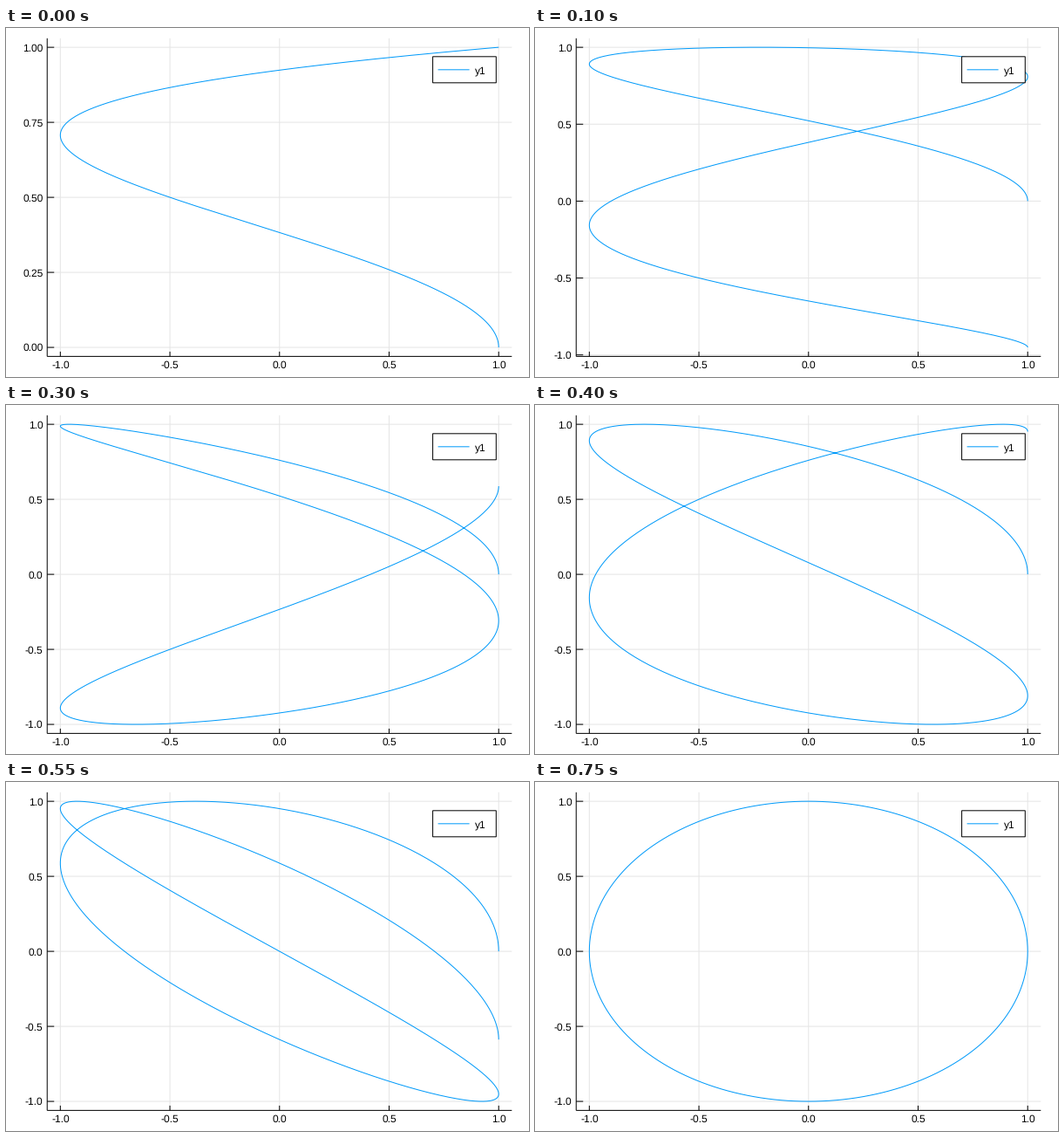
Recreate the animation shown at these times as a matplotlib script. Size 600 px wide and 400 px high, loop 800 ms.

```python
import numpy as np
import matplotlib.pyplot as plt
from matplotlib.animation import FuncAnimation
from matplotlib.patches import Rectangle

W, H, DPI = 600, 400, 100
FRAMES, INTERVAL = 16, 50
PX = 72 / DPI  # one pixel in points

LEFT, RIGHT, TOP, BOTTOM = 47.24, 580.31, 11.81, 376.38
TICK = 0.015  # tick length as a share of the plot area
PAD = 0.03
BLUE = "#009afa"
GRID = "#e5e5e5"

plt.rcParams.update({
    "font.family": "Liberation Sans",
    "font.size": 12 * PX,
    "text.hinting": "none",
})

fig = plt.figure(figsize=(W / DPI, H / DPI), dpi=DPI, facecolor="white")
ax = fig.add_axes([0, 0, 1, 1])

theta = np.linspace(0, 4 * np.pi, 801)


def scale(lo, hi, start, end):
    """Map data values to pixels with a small margin on both sides."""
    pad = PAD * (hi - lo)
    lo, hi = lo - pad, hi + pad
    return lambda v: start + (v - lo) / (hi - lo) * (end - start), lo, hi


def curve(ratio):
    """Two turns of the curve, or one where the second retraces the first."""
    x, y = np.cos(theta), np.sin(ratio * theta)
    half = len(theta) // 2
    first, second = y[:half + 1], y[half:]
    if np.allclose(first, second) or np.allclose(first, second[::-1]):
        return x[:half + 1], first
    return x, y


def line(xs, ys, color="black", z=3):
    ax.plot(xs, ys, color=color, lw=PX, zorder=z, snap=False,
            solid_capstyle="butt")


def label(x, y, text, ha):
    ax.text(x, y, text, ha=ha, va="baseline", color="black", zorder=6)


def draw_x_axis(to_x):
    for v in np.arange(-1, 1.1, 0.5):
        x = to_x(v)
        line([x, x], [TOP, BOTTOM], GRID, 1)
        line([x, x], [BOTTOM, BOTTOM - TICK * (BOTTOM - TOP)])
        label(x, 390, f"{v:.1f}", "center")
    line([LEFT, RIGHT], [BOTTOM, BOTTOM])


def draw_y_axis(to_y, lo, hi):
    step, digits = (0.25, 2) if hi - lo < 1.2 else (0.5, 1)
    for k in range(int(np.ceil(lo / step)), int(np.floor(hi / step)) + 1):
        v = k * step
        y = to_y(v)
        line([LEFT, RIGHT], [y, y], GRID, 1)
        line([LEFT, LEFT + TICK * (RIGHT - LEFT)], [y, y])
        label(42.4, y + 4.3, f"{v:.{digits}f}", "right")
    line([LEFT, LEFT], [TOP, BOTTOM])


def draw_legend():
    text_x, mid_y = 537.6, TOP + 36
    ax.add_patch(Rectangle((text_x - 48, mid_y - 15), RIGHT - text_x + 30, 30,
                           facecolor="white", edgecolor="black", lw=PX,
                           snap=False, zorder=5))
    line([text_x - 42, text_x - 6], [mid_y, mid_y], BLUE, 6)
    label(text_x, mid_y + 4.3, "y1", "left")


def draw(frame):
    ax.clear()
    ax.set(xlim=(0, W), ylim=(H, 0))
    ax.axis("off")

    x, y = curve(0.25 + 0.05 * frame)
    # Ignore rounding noise at the ends of the range.
    low, high = np.round([y.min(), y.max()], 3)
    to_x, _, _ = scale(-1, 1, LEFT, RIGHT)
    to_y, lo, hi = scale(low, high, BOTTOM, TOP)

    draw_x_axis(to_x)
    draw_y_axis(to_y, lo, hi)
    line(to_x(x), to_y(y), BLUE, 4)
    draw_legend()
    return ax.get_children()


anim = FuncAnimation(fig, draw, frames=FRAMES, interval=INTERVAL,
                     init_func=lambda: [], repeat=True, repeat_delay=0)
plt.show()
```
